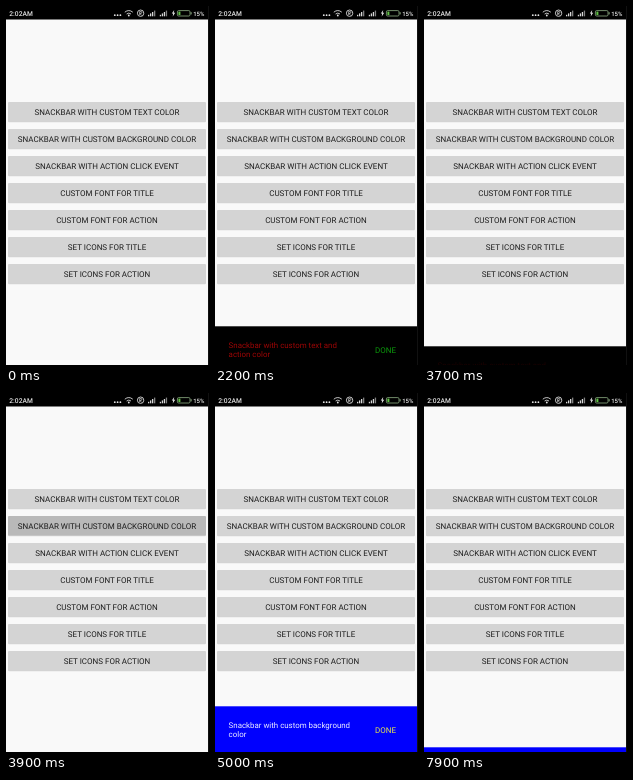
Recreate the animation shown at these times as an HTML page. Size 203 by 359 pixels, loop 8 s.

```html
<!DOCTYPE html>
<html lang="en">
<head>
<meta charset="utf-8">
<title>Snackbar demo</title>
<style>
  html, body { margin: 0; width: 100%; height: 100%; overflow: hidden; background: #f9f9f9; }
  svg { display: block; width: 100%; height: 100%; }
  text { font-family: Roboto, "Liberation Sans", sans-serif; text-rendering: geometricPrecision; }
</style>
</head>
<body>
<svg viewBox="0 0 203 359">
  <rect width="203" height="359" fill="#f9f9f9"/>
  <g id="buttons" font-size="8" text-anchor="middle" fill="#1c1c1c"></g>

  <g id="snack" font-size="7.9">
    <rect id="panel" y="313.3" width="202" height="46"/>
    <g id="label">
      <text id="line1" x="13.6" y="335"/>
      <text id="line2" x="13.6" y="344.2"/>
      <text id="action" x="160" y="339.8" font-size="8">DONE</text>
    </g>
  </g>

  <rect width="203" height="13.5" fill="#000"/>
  <g fill="#e6e6e6">
    <g font-weight="500">
      <text x="3.3" y="9.9" font-size="6.7">2:02AM</text>
      <text x="187.2" y="9.7" font-size="6">15%</text>
    </g>
    <circle cx="108.8" cy="9.2" r=".9"/>
    <circle cx="111.6" cy="9.2" r=".9"/>
    <circle cx="114.4" cy="9.2" r=".9"/>
    <circle cx="122.8" cy="9.5" r=".9"/>
    <path d="M168.2 4 165.8 7.6h1.4l-.5 3 2.5-3.8h-1.5z"/>
  </g>
  <g fill="none" stroke="#d8d8d8" stroke-width=".9">
    <path d="M118.8 6.2q4-3.3 8 0M120.6 8q2.2-1.8 4.4 0"/>
    <circle cx="134.6" cy="7.2" r="3.2"/>
    <path d="M133.7 9V5.5h1.2a.9.9 0 0 1 0 1.9h-1.1l1.7 1.6" stroke-width=".7"/>
  </g>
  <g id="signals" fill="#d8d8d8"></g>
  <rect x="171.4" y="4.6" width="12.6" height="5.4" rx="1.2" fill="none" stroke="#8fae84" stroke-width=".8"/>
  <rect x="172.4" y="5.6" width="2" height="3.4" fill="#5fc443"/>
  <rect x="184.6" y="6.2" width="1" height="2.2" fill="#8fae84"/>
  <rect x="202" width="1" height="359" fill="#111"/>
</svg>
<script>
const LOOP = 8000, STEP = 100, HEIGHT = 46;
const ENTER = 400, LEAVE = 437;
const NS = "http://www.w3.org/2000/svg";
const $ = id => document.getElementById(id);

function add(parent, tag, attrs, text = "") {
  const el = document.createElementNS(NS, tag);
  for (const key in attrs) el.setAttribute(key, attrs[key]);
  el.textContent = text;
  return parent.appendChild(el);
}

const titles = [
  "SNACKBAR WITH CUSTOM TEXT COLOR",
  "SNACKBAR WITH CUSTOM BACKGROUND COLOR",
  "SNACKBAR WITH ACTION CLICK EVENT",
  "CUSTOM FONT FOR TITLE",
  "CUSTOM FONT FOR ACTION",
  "SET ICONS FOR TITLE",
  "SET ICONS FOR ACTION"
];
const buttons = titles.map((title, i) => {
  const y = 96 + 27 * i, box = { x: 2, width: 198, height: 19.5, rx: 1 };
  add($("buttons"), "rect", { ...box, y: y + .8, fill: "#bdbdbd", opacity: .6 });
  const face = add($("buttons"), "rect", { ...box, y });
  add($("buttons"), "text", { x: 101, y: y + 12.9 }, title);
  return face;
});

for (const x of [142, 153.8])
  for (let i = 0; i < 4; i++) {
    const h = 1.5 + 1.4 * i;
    add($("signals"), "rect", { x: x + 2 * i, y: 10.3 - h, width: 1.3, height: h, opacity: i < 3 ? 1 : .6 });
  }

const presses = [
  { button: 0, from: 100, to: 1500 },
  { button: 1, from: 3900, to: 4400 }
];
const snacks = [
  { enter: 1900, leave: 3455, panel: "#000", ink: "#d60808", accent: "#10d010",
    lines: ["Snackbar with custom text and", "action color"] },
  { enter: 4600, leave: 7555, panel: "#0000fe", ink: "#eeeeff", accent: "#e6e64a",
    lines: ["Snackbar with custom background", "color"] }
];

// Eased progress from 0 to 1 over a span of time
function ease(t, from, length) {
  const x = Math.min(1, Math.max(0, (t - from) / length));
  return (1 - Math.cos(Math.PI * x)) / 2;
}

function draw(time) {
  const t = Math.floor(time % LOOP / STEP) * STEP;

  buttons.forEach((face, i) => {
    const down = presses.some(p => p.button === i && t >= p.from && t < p.to);
    face.setAttribute("fill", down ? "#b9b9b9" : "#d4d4d4");
  });

  const snack = snacks.find(s => t > s.enter && t < s.leave + LEAVE);
  $("snack").setAttribute("visibility", snack ? "visible" : "hidden");
  if (!snack) return;
  const { enter, leave } = snack;
  const shown = ease(t, enter, ENTER) - ease(t, leave, LEAVE);
  const alpha = ease(t, enter + .28 * ENTER, .72 * ENTER) - ease(t, leave, .72 * LEAVE);
  $("snack").setAttribute("transform", `translate(0 ${Math.round(HEIGHT * (1 - shown))})`);
  $("label").setAttribute("opacity", alpha);
  $("label").setAttribute("fill", snack.ink);
  $("action").setAttribute("fill", snack.accent);
  $("panel").setAttribute("fill", snack.panel);
  $("line1").textContent = snack.lines[0];
  $("line2").textContent = snack.lines[1];
}

const start = performance.now();
function tick() {
  draw(performance.now() - start);
  requestAnimationFrame(tick);
}
tick();
</script>
</body>
</html>
```
